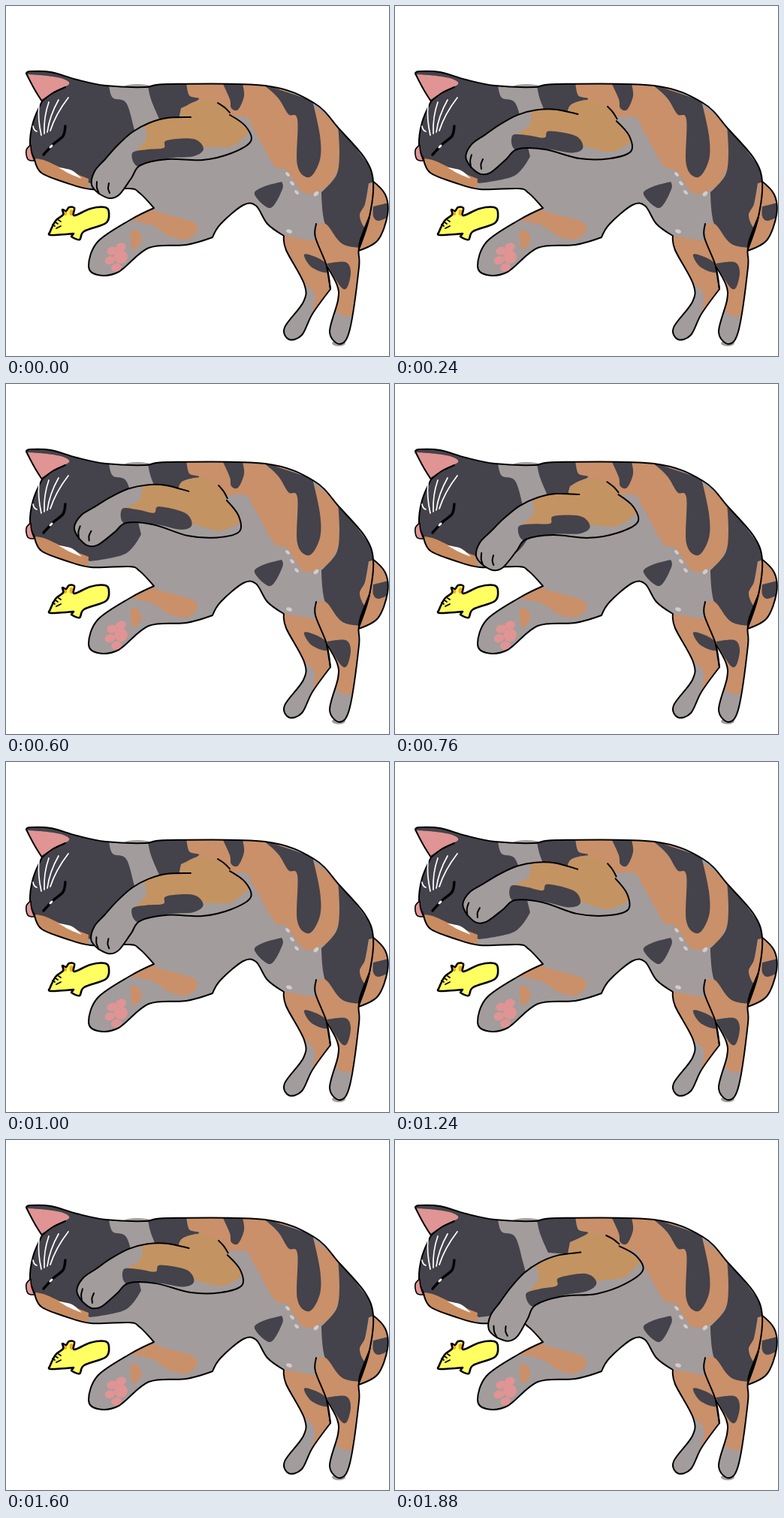
An HTML page with a canvas that plays this animation: 510 px wide and 466 px high, repeating every 1.92 s.

```html
<!DOCTYPE html>
<html>
<head>
<meta charset="utf-8">
<style>
html, body { margin: 0; width: 100%; height: 100%; overflow: hidden; background: #fff; }
canvas { display: block; }
</style>
</head>
<body>
<canvas id="stage" width="510" height="466"></canvas>
<script>
const ctx = document.getElementById('stage').getContext('2d');
const GREY = '#a39c9c', DARK = '#44424a', ORANGE = '#c9906a', TAN = '#c49362', PINK = '#e09494';
ctx.lineCap = ctx.lineJoin = 'round';

// Smooth curve through "x,y" key points; "x,y!" is a sharp corner.
function curve(text, closed = true) {
  const p = text.trim().split(/\s+/).map(s => [...s.replace('!', '').split(',').map(Number), s.endsWith('!')]);
  const n = p.length, path = new Path2D();
  const at = i => closed ? p[(i + n) % n] : p[Math.max(0, Math.min(n - 1, i))];
  const handle = (i, side) => [0, 1].map(k =>
    at(i)[k] + (at(i)[2] ? 0 : side * (at(i + 1)[k] - at(i - 1)[k]) / 6));
  path.moveTo(p[0][0], p[0][1]);
  for (let i = 0; i < (closed ? n : n - 1); i++)
    path.bezierCurveTo(...handle(i, 1), ...handle(i + 1, -1), at(i + 1)[0], at(i + 1)[1]);
  if (closed) path.closePath();
  return path;
}
const stroke = text => curve(text, false);
const patch = (color, text) => [color, curve(text)];

function fill(color, path) { ctx.fillStyle = color; ctx.fill(path); }
function line(path, width = 2, color = '#000') {
  ctx.lineWidth = width;
  ctx.strokeStyle = color;
  ctx.stroke(path);
}
function oval(color, x, y, rx, ry, turn = 0) {
  const path = new Path2D();
  path.ellipse(x, y, rx, ry, turn, 0, 7);
  fill(color, path);
}
function patched(path, color, patches) {
  fill(color, path);
  ctx.save();
  ctx.clip(path);
  for (const [c, p] of patches) fill(c, p);
  ctx.restore();
}

const back = `27,90! 32,87 60,88 94,98 133,106 185,108 215,104 345,106 410,129 444,164 478,203
  489,234 484,280 470,322`;
const legs = `470,348 458,430 445,450 431,434 442,392 441,372 427,346! 432,377! 408,410 394,438 377,444
  371,428 396,394 397,370 373,325 370,306!`;
const belly = `348,290 333,266 316,265 286,290 275,308! 240,318 190,322 150,354 122,358 110,346
  122,314 165,285 197,269!`;
const face = '178,249 164,243 113,244 79,235 47,222 38,204! 32,185 36,155 48,127! 38,111';
const body = curve([back, legs, belly, face].join(' '));

const coat = [
  patch(ORANGE, `239,98! 345,98! 450,165 437,228 415,247 395,248 374,219 357,212 330,165 312,147
    230,160! 233,136! 257,124 244,119`),
  patch(DARK, '18,80! 90,80! 137,104! 142,122 160,129 171,165 180,200! 159,226 112,236! 20,205!'),
  patch(DARK, '188,100! 240,100! 244,119 257,124 233,136! 230,152! 204,150! 193,124'),
  patch(DARK, '289,104! 315,104! 317,120 309,138 300,136 298,124'),
  patch(DARK, '342,104! 362,122 376,144 388,151 388,212 404,228 418,205 418,172 408,126!'),
  patch(DARK, `442,158! 500,234! 483,236! 478,264 471,279 481,290 470,322! 448,317 425,290
    420,248! 440,225 444,195`),
  patch(ORANGE, '484,236! 498,232! 490,284! 479,296 471,279 479,262'),
  patch(DARK, '331,251 342,241 367,234! 368,244 352,269'),
  patch(ORANGE, `365,305! 412,313! 414,291! 427,291 448,317 478,322! 462,409 436,403! 443,380!
    434,374! 407,411! 411,384 395,368!`),
  patch(DARK, '397,331 412,334 426,343 426,355 406,347'),
  patch(DARK, '427,343! 452,341 459,354 454,375 445,373'),
  patch(ORANGE, '162,285! 190,268! 205,275 250,288 253,302 238,311 215,305 195,292'),
  patch(ORANGE, '166,300 177,301 180,314 169,324'),
  patch('#c88c60', '34,203! 50,205 75,216 110,230! 109,246! 85,243! 42,224!'),
  patch('#fff', '70,215! 88,219 101,230! 84,223'),
  patch(PINK, '29,91! 55,93 76,97 84,104 66,113 47,125! 37,111')
];
const tail = curve('487,232! 505,251 508,278 495,312 469,326! 484,280');
const tailMark = [patch(DARK, '489,267! 513,261! 511,280! 496,286 489,280')];
const nose = curve('33,185! 27,192 29,204 38,206! 34,195');
const bodyLines = ['413,290 412,308 427,346 432,377', '470,322 472,311 484,280', '48,127 62,116 79,108'].map(stroke);
const lid = stroke('79,160 76,173 63,184 50,198');

const mouse = curve(`58,302! 66,286 76,278 75,271 80,273 84,268 91,269 91,279 112,270 132,268 137,275
  133,289 104,300 98,311 87,307! 90,303! 60,305`);

const limb = `246,148 215,149 190,156 168,168 148,186 132,204 118,220 114,238 124,250! 138,256 151,251
  167,229 179,212 215,204 262,205 300,196 326,180 319,160 298,145!`;
const arm = curve(limb + ' 284,130 257,126 235,137 232,148!');
const armLine = stroke(limb);
const armCoat = [
  patch(TAN, '183,155! 187,177 172,192! 262,188 302,186 330,160! 300,128! 257,120! 230,136!'),
  patch(DARK, '168,196 188,191 210,189 214,179 250,177 263,190 250,200 215,203 177,214')
];
const armMarks = ['121,234 121,242 124,250', '137,236 136,243 138,249', '282,129 291,135 298,142'].map(stroke);

function drawWhiskers() {
  const hairs = new Path2D('M36 160Q37 166 41 167');
  for (let i = 0; i < 4; i++) {
    hairs.moveTo(47 + 4 * i, 172 - 2 * i);
    hairs.quadraticCurveTo(42 + 8 * i, 150 - 2 * i, 44 + 13 * i, 131 - 3 * i);
  }
  line(hairs, 1.7, '#fff');
}
function drawPads() {
  oval(PINK, 153, 334, 9, 9);
  for (let i = 0; i < 4; i++) {
    const a = -1.5 - .95 * i;
    oval(PINK, 152 + 14 * Math.cos(a), 335 + 14 * Math.sin(a), 7, 5.5, -.3);
  }
}
function drawCat() {
  oval(GREY, 175, 107, 17, 3);
  oval(GREY, 443, 449, 9, 4);
  patched(tail, ORANGE, tailMark);
  line(tail);
  patched(body, GREY, coat);
  line(body);
  bodyLines.forEach(p => line(p));
  fill(PINK, nose);
  line(nose, 1.6);
  drawWhiskers();
  line(lid, 3.4);
  oval('#fff', 60, 187, 3, 1.6, -.8);
  drawPads();
  for (let i = 0; i < 3; i++) oval('#d2cdcd', 375 + 6 * i, 224 + 12 * i, 3.5, 2, .8);
  oval('#d2cdcd', 413, 250, 4, 2.5, -.8);
  oval('#d2cdcd', 377, 300, 4, 2.5, .3);
}
function drawMouse() {
  fill('#ffff62', mouse);
  oval('#f5a623', 79, 276, 2, 3);
  oval('#f5a623', 87, 275, 2.5, 4);
  line(mouse, 2.6);
  const marks = new Path2D('M67 296L73 293');
  for (let i = 0; i < 3; i++) {
    marks.moveTo(62 + 4 * i, 291 - 3 * i);
    marks.lineTo(65 + 4 * i, 293 - 3 * i);
  }
  line(marks, 1.8);
}
function drawArm(degrees) {
  ctx.save();
  ctx.translate(262, 136);
  ctx.rotate(degrees * Math.PI / 180);
  ctx.translate(-262, -136);
  patched(arm, GREY, armCoat);
  line(armLine);
  armMarks.forEach(p => line(p));
  ctx.restore();
}

// Each swing lifts the paw, lowers it past rest, then snaps back.
const SWING = 960, STEP = 40, PEAK = 440, LIFT = 26, DROP = 31.7;
const ease = p => (1 - Math.cos(Math.PI * p)) / 2;
function angle(t) {
  if (t < PEAK) return LIFT * ease((t / PEAK) ** 1.1);
  const p = (t - PEAK) / (SWING - STEP - PEAK);
  return LIFT - DROP * (ease(p) + p) / 2;
}

const start = performance.now();
function frame() {
  const t = Math.floor((performance.now() - start) % SWING / STEP) * STEP;
  ctx.fillStyle = '#fff';
  ctx.fillRect(0, 0, 510, 466);
  drawCat();
  drawMouse();
  drawArm(angle(t));
  requestAnimationFrame(frame);
}
frame();
</script>
</body>
</html>
```
